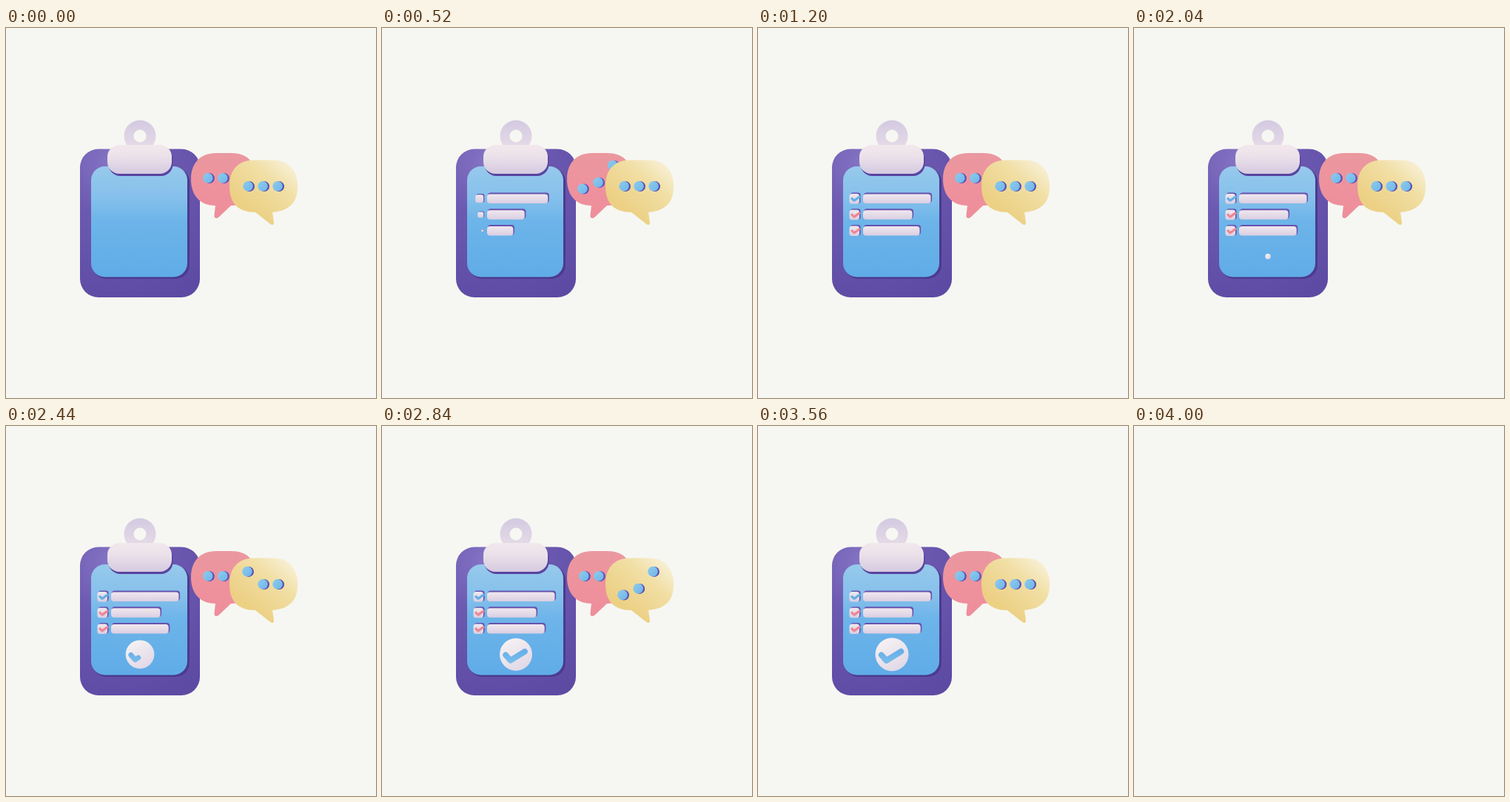
An HTML page for the animation above (4040 ms loop, 500 by 500 pixels).

```html
<!DOCTYPE html>
<html lang="en">
<head>
<meta charset="utf-8">
<title>Checklist and chat</title>
<style>
  html, body { margin: 0; width: 100%; height: 100%; overflow: hidden; background: #f6f7f2; }
  svg { display: block; width: 100vw; height: 100vh; }
</style>
</head>
<body>
<svg viewBox="0 0 500 500">
  <defs>
    <radialGradient id="board" gradientUnits="userSpaceOnUse" cx="140" cy="182" r="200">
      <stop offset="0" stop-color="#8474c4"/>
      <stop offset=".35" stop-color="#6c59b0"/>
      <stop offset="1" stop-color="#5d4aa3"/>
    </radialGradient>
    <linearGradient id="sheet" x2="0" y2="1">
      <stop offset="0" stop-color="#97c9ec"/>
      <stop offset=".28" stop-color="#85c0eb"/>
      <stop offset=".5" stop-color="#6cb4e9"/>
      <stop offset="1" stop-color="#60ace8"/>
    </linearGradient>
    <linearGradient id="clip" x2="0" y2="1">
      <stop offset="0" stop-color="#f2e8ec"/>
      <stop offset=".4" stop-color="#ebe1ea"/>
      <stop offset="1" stop-color="#d5cae0"/>
    </linearGradient>
    <linearGradient id="ring" x2="0" y2="1">
      <stop offset="0" stop-color="#d3cae1"/>
      <stop offset="1" stop-color="#e8dde8"/>
    </linearGradient>
    <linearGradient id="pale" x2="0" y2="1">
      <stop offset="0" stop-color="#f0e8ee"/>
      <stop offset="1" stop-color="#d9cee2"/>
    </linearGradient>
    <linearGradient id="disc" x1=".2" y1="0" x2=".8" y2="1">
      <stop offset="0" stop-color="#f7f3f3"/>
      <stop offset="1" stop-color="#dfd6e6"/>
    </linearGradient>
    <linearGradient id="tick" gradientUnits="userSpaceOnUse" x1="0" y1="300" x2="0" y2="322">
      <stop offset="0" stop-color="#62ade8"/>
      <stop offset="1" stop-color="#7cbeeb"/>
    </linearGradient>
    <linearGradient id="pink" x2="0" y2="1">
      <stop offset="0" stop-color="#ea989f"/>
      <stop offset=".5" stop-color="#ee929d"/>
      <stop offset="1" stop-color="#ee8d9b"/>
    </linearGradient>
    <linearGradient id="gold" gradientUnits="userSpaceOnUse" x1="382" y1="180" x2="328" y2="244">
      <stop offset="0" stop-color="#f8f1d9"/>
      <stop offset=".4" stop-color="#f1dfa5"/>
      <stop offset="1" stop-color="#ecd084"/>
    </linearGradient>
    <linearGradient id="dot" x2="1" y2="1">
      <stop offset="0" stop-color="#8fcbec"/>
      <stop offset="1" stop-color="#6fb5e9"/>
    </linearGradient>
  </defs>
  <rect width="500" height="500" fill="#f6f7f2"/>
  <g id="scene">
    <rect x="100" y="163.5" width="162" height="200.5" rx="25" fill="url(#board)"/>
    <rect x="117" y="189" width="131" height="150" rx="19" fill="#4b3a8e"/>
    <rect x="115" y="187" width="130" height="149.5" rx="18.5" fill="url(#sheet)"/>
    <path d="M202.5 146a21.5 21.5 0 1 0-43 0a21.5 21.5 0 1 0 43 0zM189.500 146a8.500 8.500 0 1 1-17 0a8.500 8.500 0 1 1 17 0z"
      fill="url(#ring)" fill-rule="evenodd"/>
    <rect x="138.500" y="161" width="87" height="39" rx="16" fill="#5843a0"/>
    <rect x="137" y="158" width="87" height="39" rx="16" fill="url(#clip)"/>
    <g id="rows"></g>
    <g id="badge">
      <circle r="22.500" fill="url(#disc)" cx="181" cy="308.700"/>
      <path id="done" d="M166.800 309.500L173.300 317L193.200 304.800" fill="none" stroke="url(#tick)"
        stroke-width="8" stroke-linecap="round" stroke-linejoin="round" pathLength="100"/>
    </g>
    <path d="M284 169H304C326 169 338 181 338 204.500S326 240 304 240L287 256Q281.500 259 281.500 253L283 240C262 240 250 226 250 204.500S262 169 284 169z" fill="url(#pink)"/>
    <g id="pinkDots"></g>
    <path d="M336 178.500H360C382 178.500 394 191 394 214S382 247 360 249L362 263Q362 267 358 265.500L337 249C314 249 302 237 302 214S314 178.500 336 178.500z" fill="url(#gold)"/>
    <g id="goldDots"></g>
  </g>
</svg>
<script>
const LOOP = 4040, STEP = 40, BLANK = 4000;
const $ = id => document.getElementById(id);
const clamp = p => Math.min(1, Math.max(0, p));
const part = (t, start, len) => clamp((t - start) / len);
const outCubic = p => 1 - (1 - p) ** 3;
const sine = p => (1 - Math.cos(Math.PI * p)) / 2;

function add(parent, name, attrs) {
  const el = document.createElementNS("http://www.w3.org/2000/svg", name);
  set(el, attrs);
  return parent.appendChild(el);
}
function set(el, attrs) {
  for (const key in attrs) el.setAttribute(key, attrs[key]);
}
// Reveals a stroke whose pathLength is 100
function draw(el, p) {
  set(el, { "stroke-dasharray": `${100 * p} 200`, visibility: p > 0 ? "inherit" : "hidden" });
}
function scaleAt(el, x, y, s) {
  set(el, { transform: `translate(${x} ${y}) scale(${s}) translate(${-x} ${-y})`,
    visibility: s > 0 ? "visible" : "hidden" });
}

const rows = [
  { y: 230.5, width: 91.5, start: 40, len: 900, color: "#62b0e6" },
  { y: 252.3, width: 66.5, start: 120, len: 1050, color: "#ef8793" },
  { y: 274, width: 77.7, start: 300, len: 1200, color: "#ef8793" }
].map((row, i) => {
  const { y, color } = row;
  const bar = [
    add($("rows"), "rect", { x: 143, y: y - 8, height: 13.5, fill: "#6752ae" }),
    add($("rows"), "rect", { x: 142, y: y - 6, height: 12.5, fill: "url(#pale)" })
  ];
  const box = add($("rows"), "g", {});
  add(box, "rect", { x: 124.8, y: y - 8, width: 13.8, height: 14.5, rx: 3.5, fill: "#6752ae" });
  add(box, "rect", { x: 123.5, y: y - 6.5, width: 13.5, height: 13.5, rx: 3.5, fill: "url(#pale)" });
  const mark = add(box, "path", {
    d: `M127 ${y}L130 ${y + 2.8}L137 ${y - 2.2}`, fill: "none", stroke: color,
    "stroke-width": 3.2, "stroke-linecap": "round", "stroke-linejoin": "round", pathLength: 100
  });
  return { ...row, bar, box, mark, boxStart: 320 + 80 * i, markStart: 600 + 120 * i };
});

function makeDots(id, x, y, start) {
  return [0, 1, 2].map(i => {
    const el = add($(id), "g", {});
    add(el, "circle", { cx: x + 20 * i + 2, cy: y + 0.3, r: 7, fill: "#5b50b4" });
    add(el, "circle", { cx: x + 20 * i, cy: y, r: 6.8, fill: "url(#dot)" });
    return { el, start: start + 200 * i };
  });
}
const dots = [
  ...makeDots("pinkDots", 272.8, 202.8, 0),
  ...makeDots("goldDots", 327, 213.8, 2320)
];

// Hop up, dip below, settle
function hop(t) {
  const keys = [[0, 0], [150, -19], [420, 16.5], [850, 0]];
  for (let i = 1; i < keys.length; i++) {
    const [t0, v0] = keys[i - 1], [t1, v1] = keys[i];
    if (t < t1) return v0 + (v1 - v0) * sine(part(t, t0, t1 - t0));
  }
  return 0;
}

function render(t) {
  set($("scene"), { visibility: t < BLANK ? "visible" : "hidden" });
  if (t >= BLANK) {
    set($("scene"), { display: "none" });
    return;
  }
  $("scene").removeAttribute("display");
  for (const r of rows) {
    const w = r.width * outCubic(part(t, r.start, r.len));
    for (const el of r.bar) set(el, { width: w > 0 ? w + (el === r.bar[0] ? 0.6 : 0) : 0, rx: Math.min(4, w / 2) });
    scaleAt(r.box, 137.5, r.y, outCubic(part(t, r.boxStart, 480)));
    draw(r.mark, sine(part(t, r.markStart, 400)));
  }
  scaleAt($("badge"), 181, 308.7, t > 2000 ? 1 - Math.exp((2000 - t) / 225) : 0);
  draw($("done"), part(t, 2200, 500));
  for (const d of dots) {
    const dy = hop(t - d.start);
    set(d.el, { transform: `translate(${dy > 0 ? -0.14 * dy : 0.06 * dy} ${dy})` });
  }
}

const origin = performance.now();
function tick() {
  const t = (performance.now() - origin) % LOOP;
  render(Math.floor(t / STEP) * STEP);
  requestAnimationFrame(tick);
}
tick();
</script>
</body>
</html>
```
